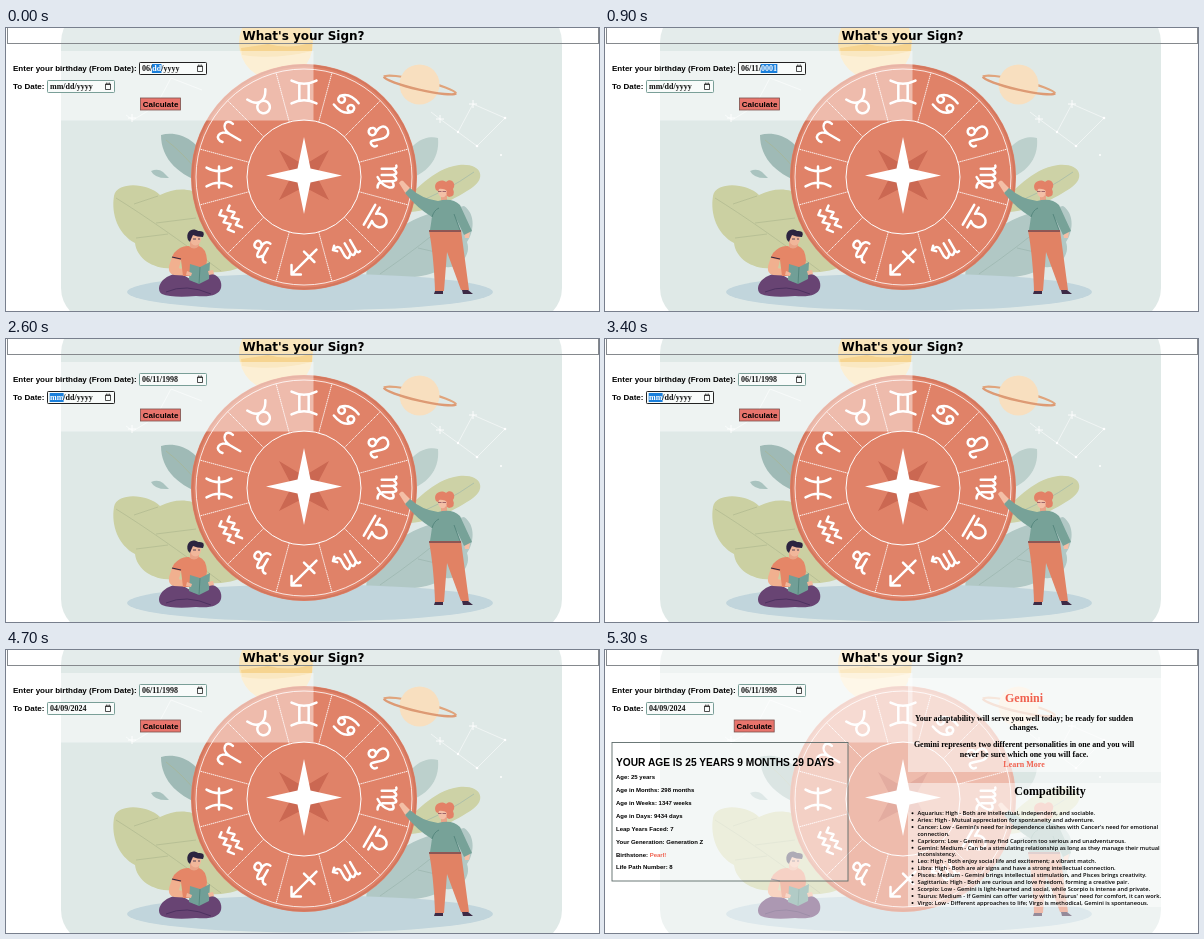
Write an HTML page that moves like this. It is 593x283 px and loops after 5400 ms.

```html
<!DOCTYPE html>
<html lang="en">
<head>
<meta charset="utf-8">
<title>What's your Sign?</title>
<style>
html, body { margin: 0; width: 100%; height: 100%; overflow: hidden; background: #fff; }
svg { display: block; width: 593px; height: 283px; }
.sans { font: bold 8px "Liberation Sans", Arial, sans-serif; }
.serif { font: bold 8px "Liberation Serif", "Times New Roman", serif; }
.mid { text-anchor: middle; }
.hot { fill: #f0614f; }
.title { font: bold 12px "DejaVu Sans", sans-serif; }
.h2 { font-size: 12px; }
.age { font-size: 10.2px; }
.fact { font-size: 6px; }
.list { font: 600 5.7px "Open Sans", sans-serif; }
.tiny { font: 3.1px "Liberation Sans", Arial, sans-serif; text-anchor: middle; }
.line { fill: none; stroke: #fff; }
.glyph { stroke-width: 2.4; stroke-linecap: round; stroke-linejoin: round; }
</style>
</head>
<body>
<svg viewBox="0 0 593 283">
  <defs>
    <filter id="shadow" x="-30%" y="-30%" width="160%" height="170%">
      <feDropShadow dx="0" dy="4" stdDeviation="4" flood-color="#20383c" flood-opacity=".4"/>
    </filter>
  </defs>
  <rect x="55" y="-20" width="501" height="314" rx="34" fill="#dfe9e7"/>

  <!-- sky -->
  <circle cx="270" cy="15" r="37" fill="#f9e2b0"/>
  <path d="M235 20L262 16Q285 22 306 14V23Q270 32 236 27Z" fill="#f6d490"/>
  <path d="M378 48.700a37 5 13 0 1 72 16.600" fill="none" stroke="#e0a47c" stroke-width="2.200"/>
  <circle cx="413.500" cy="56.500" r="20" fill="#f8dfbf"/>
  <path d="M378 48.700a37 5 13 0 0 72 16.600" fill="none" stroke="#dd9a74" stroke-width="2.400"/>
  <g class="line" stroke-width=".6" opacity=".9">
    <path d="M425 84L434 91L452 104L467 76L499 90L471 118L452 104M120 87L127 92L150 78L165 50L196 62"/>
    <path d="M463 76h8M467 72v8M430 91h8M434 87v8M122 90h8M126 86v8" stroke-width="1"/>
  </g>
  <g fill="#fff"><circle cx="499" cy="90" r="1.300"/><circle cx="471" cy="118" r="1.300"/><circle cx="452" cy="104" r="1.200"/><circle cx="495" cy="127" r="1"/><circle cx="150" cy="78" r="1.200"/></g>

  <!-- plants and ground -->
  <path d="M145 143Q152 140 157 144L163 150Q149 151 145 143Z" fill="#a9c3bf"/>
  <path d="M200 156C174 148 155 132 155 107C172 102 192 112 200 132Z" fill="#9fbab6"/>
  <path d="M108 168C111 153 142 155 154 167C168 160 184 159 196 168L240 236C226 247 192 246 172 240C150 243 131 232 129 215C112 206 105 186 108 168Z" fill="#cbd0a2"/>
  <path d="M398 134C404 114 420 107 432 110C434 132 420 146 400 152Z" fill="#bcd0cc"/>
  <path d="M392 176C410 164 425 141 453 137C476 135 480 150 467 159C450 171 420 186 396 184Z" fill="#cdd2a6"/>
  <path d="M360 250C362 218 385 207 400 196C420 184 440 182 458 178C470 186 468 204 461 214C466 228 452 241 440 239C420 252 380 252 360 250Z" fill="#b1c8c5"/>
  <path d="M110 170Q152 196 215 243M128 176L152 168M130 210L162 206M150 195L190 190M160 112Q176 124 194 146" fill="none" stroke="#aab48c" stroke-width=".6"/>
  <path d="M374 246Q412 220 455 184M412 220L438 226M428 207L426 190M402 178Q440 164 468 144" fill="none" stroke="#98b2aa" stroke-width=".6"/>
  <ellipse cx="304" cy="264" rx="183" ry="18.500" fill="#c1d5dc"/>

  <!-- wheel -->
  <circle cx="298" cy="149" r="113" fill="#e08268"/>
  <circle cx="298" cy="149" r="111.500" fill="none" stroke="#d3775e" stroke-width="2"/>
  <g id="wheel" class="line" transform="translate(298 149)">
    <circle r="108" stroke-width=".8"/>
    <circle r="57" stroke-width="1"/>
    <path d="M-25-27L0-12L25-27L12-2L25 23L0 10L-25 23L-12-2Z" fill="#cb6852" stroke="none"/>
    <path d="M0-40L6.500-8.500L38-1.500L6.500 5.500L0 37L-6.500 5.500L-38-1.500L-6.500-8.500Z" fill="#fff" stroke="none"/>
  </g>

  <!-- reader -->
  <path d="M174 245C154 247 149 262 156 266Q166 270 190 268Q212 270 215 260C217 250 208 244 199 246L189 254Z" fill="#684473"/>
  <path d="M160 264Q180 255 205 266" fill="none" stroke="#4d3160" stroke-width="1"/>
  <path d="M167 226L163 238Q162 246 168 247L186 248V243L173 240L176 228Z" fill="#f1b08f"/>
  <path d="M184 213h9v8h-9z" fill="#e9a387"/>
  <path d="M168 225Q175 217 183 218Q188 223 193 218Q200 220 201 232L199 248H177L175 232L166 230Z" fill="#e58667"/>
  <path d="M166 229L175 231" stroke="#33273f" stroke-width="1.200"/>
  <ellipse cx="189.500" cy="211" rx="5.500" ry="6.500" fill="#f1b69a"/>
  <path d="M182 212C179 203 187 199 192 203Q200 202 197 209Q191 209 187 207Q185 211 184 214Z" fill="#2c2440"/>
  <path d="M187 211h3m2 0h2" stroke="#2c2440" stroke-width=".8"/>
  <path d="M184 236L194 239L204 234L203 251L193 256L183 252Z" fill="#719f97"/>
  <path d="M194 239L193 256" stroke="#4f8078" stroke-width=".8"/>
  <path d="M181 243l5 2-1 3-5-1zM202 243l5-1 1 4-5 1z" fill="#f1b69a"/>

  <!-- guide -->
  <path d="M430 162C426 154 436 150 440 154C445 149 451 156 447 161Q450 168 443 169Z" fill="#e38167"/>
  <path d="M435 166h6v8h-6z" fill="#e9a387"/>
  <ellipse cx="436.500" cy="164" rx="4.200" ry="5.300" fill="#f3bfa6"/>
  <path d="M432 161Q434 155 444 159L442 164Q439 160 432 161Z" fill="#e38167"/>
  <path d="M432 163.500h3.500m1 0h3.500" stroke="#8a4f5b" stroke-width=".8"/>
  <path d="M393 155Q396 150 399 155L404 160L400 166Z" fill="#f3bfa6"/>
  <path d="M458 204h6l-1 6h-4z" fill="#f3bfa6"/>
  <path d="M429 263h8v3h-9zM456 262h6l5 4h-10z" fill="#3d2a45"/>
  <path d="M423 202H455L463 262H455L441 224L438 263H429Q428 230 423 202Z" fill="#e18264"/>
  <path d="M423 203H455" stroke="#3d2a45" stroke-width="1"/>
  <path d="M432 173Q446 169 454 177L466 203L458 207L450 190L454 202H424L426 189Q411 180 399 165L404 160Q416 171 432 173Z" fill="#77a298"/>
  <path d="M426 189Q428 182 433 180M448 186L454 202" fill="none" stroke="#4f8078" stroke-width=".8"/>

  <rect id="wash" width="593" height="283" fill="#fff" opacity=".45"/>
  <rect y="23" width="307.500" height="69.500" fill="#fff" opacity=".45"/>
  <rect x="1.500" y="-3" width="591" height="18.500" fill="#fff" fill-opacity=".15" stroke="#85898d"/>
  <text class="title mid" x="297.500" y="11.600">What's your Sign?</text>

  <!-- form -->
  <text class="sans" x="7" y="43.300">Enter your birthday (From Date):</text>
  <text class="sans" x="7" y="61.300">To Date:</text>
  <g id="fields"></g>
  <g id="button">
    <rect x="134.500" y="70" width="40" height="12" fill="#e8746c" stroke="#7a504d" stroke-width=".8"/>
    <text class="sans mid" x="154.600" y="79">Calculate</text>
  </g>

  <g id="popup">
    <rect x="41" y="65.500" width="55" height="69.500" rx="1" fill="#fff" filter="url(#shadow)"/>
    <text class="tiny" x="52" y="72.200" font-weight="bold">April 2024 ▾</text>
    <path d="M82 73.500v-5m-1.800 1.800l1.800-1.800l1.800 1.800M89 68.500v5m-1.800-1.800l1.800 1.800l1.800-1.800" fill="none" stroke="#444" stroke-width=".5"/>
    <rect x="57" y="90" width="8" height="7.500" fill="#1b6ec2"/>
    <text class="tiny" x="50" y="131" fill="#1b6ec2">Clear</text>
    <text class="tiny" x="86" y="131" fill="#1b6ec2">Today</text>
  </g>

  <g id="result">
    <rect x="7" y="92.500" width="236" height="138.500" fill="#fff" fill-opacity=".3" stroke="#5c6a69" stroke-width=".9"/>
    <g fill="#fff" fill-opacity=".5">
      <rect x="303" y="28" width="261" height="94"/>
      <rect x="303" y="133" width="261" height="124"/>
    </g>
  </g>
</svg>
<script>
const $ = id => document.getElementById(id);

function add(parent, tag, attrs, text = '') {
  const el = document.createElementNS('http://www.w3.org/2000/svg', tag);
  for (const key in attrs) el.setAttribute(key, attrs[key]);
  el.textContent = text;
  parent.append(el);
  return el;
}

// Zodiac glyphs, clockwise from the top
const ring = (x, y, r) => `M${x - r} ${y}a${r} ${r} 0 1 0 ${2 * r} 0a${r} ${r} 0 1 0 ${-2 * r} 0`;
const stems = 'M-11-7Q-8-8-8-4V7M-8-4Q-3-10-2-4V7M-2-4Q3-10 4-4';
const wave = y => `M-12 ${y}l5-4l3 5l5-5l3 5l5-5l3 4`;
const glyphs = [
  'M-12-11Q0-5 12-11M-12 11Q0 5 12 11M-4.500-8V8M4.500-8V8',
  ring(-6, -1, 3.2) + 'M-9-3Q-3-11 10-6' + ring(6, 2, 3.2) + 'M9 4Q3 12-10 7',
  ring(-5, 3, 3.5) + 'M-3 0C-10-13 7-14 6-4C5 3 0 10 5 10Q9 10 9 6',
  stems + 'V6Q5 11 10 11M4-3Q11-7 10 0Q8 7 0 11',
  'M-11 9H11M-11 4H-4C-9-2-5-9 0-9S9-2 4 4H11',
  stems + 'V5Q5 9 11 7M8 4L11 7L8 10',
  'M-12 12L12-12M3-12H12V-3M-10 0L0 10',
  'M-9-8Q-5-9-4-3V5M-4-3Q1-11 2-3V5Q1 11-4 10M2 3C3-2 10-1 9 4S3 7 2 3',
  wave(-3) + wave(6),
  'M-9-12Q-2 0-9 12M9-12Q2 0 9 12M-10 0H10',
  'M-10-3C-12-12-1-12 0-1V11M10-3C12-12 1-12 0-1',
  ring(0, 4, 6) + 'M-10-10Q-6-2 0-2T10-10'
];
glyphs.forEach((d, i) => {
  add($('wheel'), 'path', { d: 'M0-57V-108', 'stroke-width': .8, 'stroke-dasharray': '1.5 .6', transform: `rotate(${i * 30 + 15})` });
  add($('wheel'), 'path', { d, class: 'glyph', transform: `rotate(${i * 30}) translate(0 -85) scale(1.04)` });
});

// Calendar grid
for (let i = 0; i < 42; i++) {
  const row = Math.floor(i / 7), day = i - 7;
  const label = row ? (day === 0 ? 31 : (day - 1) % 30 + 1) : ['Su', 'Mo', 'Tu', 'We', 'Th', 'Fr', 'Sa'][i];
  add($('popup'), 'text', { class: 'tiny', x: 47 + i % 7 * 7, y: 80.4 + row * 7.15, fill: day === 9 ? '#fff' : '#333' }, label);
}

// Result text
const out = (cls, x, y, text) => add($('result'), 'text', { class: cls, x, y }, text);
out('sans age', 11, 116, 'YOUR AGE IS 25 YEARS 9 MONTHS 29 DAYS');
['Age: 25 years', 'Age in Months: 298 months', 'Age in Weeks: 1347 weeks', 'Age in Days: 9434 days',
  'Leap Years Faced: 7', 'Your Generation: Generation Z', 'Birthstone: ', 'Life Path Number: 8'
].forEach((text, i) => {
  const line = out('sans fact', 11, 129.4 + i * 12.85, text);
  if (i === 6) add(line, 'tspan', { class: 'hot' }, 'Pearl!');
});
out('serif h2 mid hot', 419, 52, 'Gemini');
out('serif mid', 419, 70.5, 'Your adaptability will serve you well today; be ready for sudden');
out('serif mid', 419, 79.5, 'changes.');
out('serif mid', 419, 97.3, 'Gemini represents two different personalities in one and you will');
out('serif mid', 419, 106.5, 'never be sure which one you will face.');
out('serif mid hot', 419, 117, 'Learn More');
out('serif h2 mid', 445, 145, 'Compatibility');
// A leading space marks a wrapped line
['Aquarius: High - Both are intellectual, independent, and sociable.',
  'Aries: High - Mutual appreciation for spontaneity and adventure.',
  "Cancer: Low - Gemini's need for independence clashes with Cancer's need for emotional",
  ' connection.',
  'Capricorn: Low - Gemini may find Capricorn too serious and unadventurous.',
  'Gemini: Medium - Can be a stimulating relationship as long as they manage their mutual',
  ' inconsistency.',
  'Leo: High - Both enjoy social life and excitement; a vibrant match.',
  'Libra: High - Both are air signs and have a strong intellectual connection.',
  'Pisces: Medium - Gemini brings intellectual stimulation, and Pisces brings creativity.',
  'Sagittarius: High - Both are curious and love freedom, forming a creative pair.',
  'Scorpio: Low - Gemini is light-hearted and social, while Scorpio is intense and private.',
  "Taurus: Medium - If Gemini can offer variety within Taurus' need for comfort, it can work.",
  'Virgo: Low - Different approaches to life; Virgo is methodical, Gemini is spontaneous.'
].forEach((text, i) => {
  const y = 165 + i * 6.9;
  if (text[0] !== ' ') add($('result'), 'circle', { cx: 307.5, cy: y - 1.8, r: 1 });
  out('list', 312.5, y, text.trim());
});

// Date fields
function makeField(x, y) {
  const g = add($('fields'), 'g', { transform: `translate(${x} ${y})` });
  const box = add(g, 'rect', { x: .5, y: .5, width: 67, height: 12, rx: .8, fill: '#f8fbfa' });
  const mark = add(g, 'rect', { y: 2, height: 9, fill: '#1a7fdb' });
  const text = add(g, 'text', { class: 'serif', x: 3, y: 9.2 });
  add(g, 'path', { d: 'M58.500 4h5v5.500h-5zM58.500 4.500h5M59.800 2.500v1.500M62.200 2.500v1.500', fill: 'none', stroke: '#222', 'stroke-width': .8 });
  return (value, part) => {
    const parts = value.split('/');
    const focused = part >= 0;
    box.setAttribute('stroke', focused ? '#222' : '#7a9f98');
    text.textContent = '';
    parts.forEach((word, i) => {
      if (i) add(text, 'tspan', {}, '/');
      add(text, 'tspan', { fill: i === part ? '#fff' : '#111' }, word);
    });
    mark.style.display = focused ? '' : 'none';
    if (!focused) return;
    const start = parts.slice(0, part).join('/').length + (part ? 1 : 0);
    mark.setAttribute('x', text.getStartPositionOfChar(start).x - .3);
    mark.setAttribute('width', text.getSubStringLength(start, parts[part].length) + .6);
  };
}
const fromField = makeField(133, 34), toField = makeField(41, 52);

// time, from date, selected part, to date, selected part, view
const blank = 'mm/dd/yyyy', born = '06/11/1998', today = '04/09/2024';
const steps = [
  [0, '06/dd/yyyy', 1, blank, -1],
  [200, '06/01/yyyy', 1, blank, -1],
  [400, '06/11/yyyy', 2, blank, -1],
  [800, '06/11/0001', 2, blank, -1],
  [1300, '06/11/0019', 2, blank, -1],
  [1500, '06/11/0199', 2, blank, -1],
  [1700, born, 2, blank, -1],
  [2200, born, -1, blank, 0],
  [3600, born, -1, blank, 0, 'popup'],
  [4300, born, -1, today, -1],
  [4800, born, -1, today, -1, 'result']
];

let current;
function draw() {
  const t = performance.now() % 5400;
  const step = steps.findLast(s => s[0] <= t);
  if (step !== current) {
    current = step;
    const [, from, fromPart, to, toPart, view] = step;
    const done = view === 'result';
    fromField(from, fromPart);
    toField(to, toPart);
    $('popup').style.display = view === 'popup' ? '' : 'none';
    $('result').style.display = $('wash').style.display = done ? '' : 'none';
    $('button').setAttribute('transform', done ? 'translate(-5.300 0)' : '');
  }
  requestAnimationFrame(draw);
}
draw();
</script>
</body>
</html>
```
